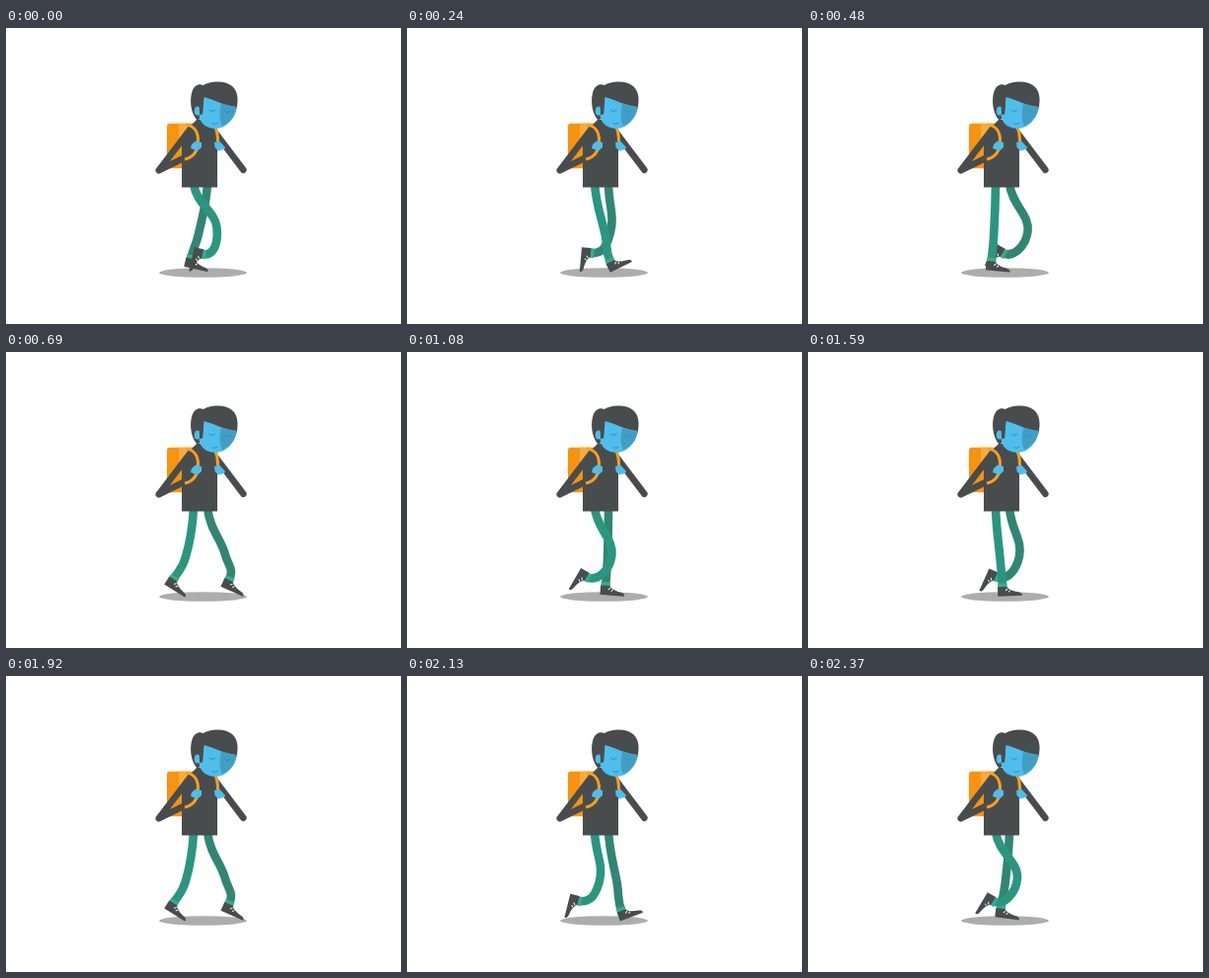
Recreate the animation shown at these times as an HTML page. Size 400 by 300 pixels, loop 2.43 s.

```html
<!DOCTYPE html>
<html lang="en">
<head>
<meta charset="utf-8">
<title>Walk cycle</title>
<style>
  html, body { margin: 0; width: 100%; height: 100%; overflow: hidden; background: #fff; }
  svg { display: block; width: 100%; height: 100%; }
  .leg, .cuff, .arm, .strap, .line, .lace { fill: none; }
  .leg { stroke-width: 8.6; }
  .cuff { stroke: #36ab93; stroke-width: 9.4; }
  .dark { fill: #494c4c; }
  .arm { stroke: #494c4c; stroke-width: 6.6; stroke-linejoin: round; stroke-linecap: round; }
  .skin { fill: #4fbeec; }
  .strap { stroke: #faa01e; stroke-width: 3; }
  .line { stroke: #318fb8; stroke-linecap: round; }
  .lace { stroke: #fff; }
</style>
</head>
<body>
<svg viewBox="0 0 400 300">
  <defs>
    <g id="shoe">
      <path class="dark" d="M-5-1H4C7 3 12 4 17 5C20 6 20.500 8.500 19 8.500H-5Z"/>
      <path class="lace" d="M3 3L5 1.200M6 4.500L7.500 2.800"/>
    </g>
  </defs>
  <ellipse cx="199.500" cy="248" rx="44.500" ry="4.800" fill="#adadad"/>

  <g id="farLeg">
    <path class="leg" stroke="#318673"/>
    <path class="cuff"/>
    <use href="#shoe"/>
  </g>
  <g id="nearLeg">
    <path class="leg" stroke="#2a9680"/>
    <path class="cuff"/>
    <use href="#shoe"/>
  </g>

  <!-- backpack -->
  <rect x="163" y="96.700" width="30" height="45.600" rx="3" fill="#f7930f"/>
  <path d="M175 96.700H192V112H175Z" fill="#fbab38"/>

  <!-- coat and arms -->
  <path class="dark" d="M187 99L194 92L212 98L214 106V161.500H178V110Z"/>
  <path class="arm" d="M187 102L154.800 144.300L190 127"/>
  <path class="arm" d="M211 105L240.300 143.800"/>
  <path class="strap" d="M182 98C191 99 194.500 106 194.500 114C194.500 124 190 131 181 133"/>
  <path class="strap" d="M211 99C213.500 103 214.500 108 214.500 115"/>
  <path class="skin" d="M188 118L192 114.500L198 116V121L194 124.500L187 122Z"/>
  <path class="skin" d="M211 116L216 114.500L222 121L221 123L215 124.500L211.500 121Z"/>

  <!-- head -->
  <path class="dark" d="M193 93C187 86 186 73 188 66C190 58 195 56 200 58C206 53.500 222 52.500 229 59C235 64 235.500 73 233.500 82L196 92Z"/>
  <path class="skin" d="M200 70C210 72 221 79 233.500 80C233 91 223 101.500 213 102C204 102 198 98 196 91L195.500 88L199 87Z"/>
  <path d="M218 76.500C223 79 228 79.700 233.500 80C233 89 226 96 219 99.500C216 93 216 85 218 76.500Z" fill="#419fc4"/>
  <ellipse class="skin" cx="193.800" cy="84" rx="3" ry="4.500"/>
  <path class="dark" d="M195.500 70H200.500L199 87.500H196Z"/>
  <path class="line" d="M206 83Q209 86 212 83M221 84Q224 87 227 84M209 97Q212 98 214 96.500"/>
</svg>
<script>
const STEP = 30, LAST = 79, LOOP = 2430, CYCLE = 41;
const HIP = { x: 190, y: 158 }, HIP_GAP = 14, LEG = 82;

// Key poses of the foot in one stride: time, ankle x and y, shoe angle.
const keys = [
  [0, 198, 229, 103],    // passing
  [2.5, 211.5, 232, 24], // reach
  [8, 206.5, 238, -26],  // heel strike
  [12, 197, 239, -2],    // flat
  [20.5, 173, 234.5, 13],// push off
  [23, 169, 231, 32],    // heel lifted
  [28.5, 171, 228, 95],  // toe off
  [36, 181, 227.5, 120]  // swing
];

function keyAt(i) {
  const n = keys.length, turn = Math.floor(i / n), [time, ...pose] = keys[i - turn * n];
  return [time + turn * CYCLE, ...pose];
}

// Smooth cyclic interpolation through the key poses.
function footAt(time) {
  const u = time % CYCLE, i = keys.findLastIndex(k => k[0] <= u);
  const [a, b, c, d] = [-1, 0, 1, 2].map(k => keyAt(i + k));
  const span = c[0] - b[0], s = (u - b[0]) / span, r = 1 - s;
  return [1, 2, 3].map(k => {
    const m0 = (c[k] - a[k]) / (c[0] - a[0]) * span;
    const m1 = (d[k] - b[k]) / (d[0] - b[0]) * span;
    return b[k] * (1 + 2 * s) * r * r + m0 * s * r * r + c[k] * s * s * (3 - 2 * s) - m1 * s * s * r;
  });
}

// The leg is a hose: the closer the ankle is to the hip, the more the knee bulges forward.
function drawLeg(id, time, shift) {
  const group = document.getElementById(id), [leg, cuff, shoe] = group.children;
  const [x, y, angle] = footAt(time);
  const dist = Math.hypot(x - HIP.x, y - HIP.y);
  const dx = (x - HIP.x) / dist, dy = (y - HIP.y) / dist;
  const bend = 0.165 * Math.max(0, LEG - dist) ** 2;
  const kx = HIP.x + dx * dist * 0.65 + dy * bend;
  const ky = HIP.y + dy * dist * 0.65 - dx * bend;
  const turn = angle * Math.PI / 180, ux = Math.sin(turn), uy = -Math.cos(turn);

  group.setAttribute('transform', `translate(${shift})`);
  leg.setAttribute('d', `M${HIP.x} ${HIP.y}
    C${HIP.x + (kx - HIP.x) * 0.15} ${HIP.y + 22} ${kx - dx * 17} ${ky - dy * 17} ${kx} ${ky}
    C${kx + dx * 14} ${ky + dy * 14} ${x + ux * 14} ${y + uy * 14} ${x} ${y}`);
  cuff.setAttribute('d', `M${x} ${y}l${ux * 4.5} ${uy * 4.5}`);
  shoe.setAttribute('transform', `translate(${x} ${y}) rotate(${angle})`);
}

function draw() {
  const step = Math.min(Math.floor(performance.now() % LOOP / STEP), LAST);
  drawLeg('nearLeg', step, 0);
  drawLeg('farLeg', step + CYCLE / 2, HIP_GAP);
  requestAnimationFrame(draw);
}
draw();
</script>
</body>
</html>
```
